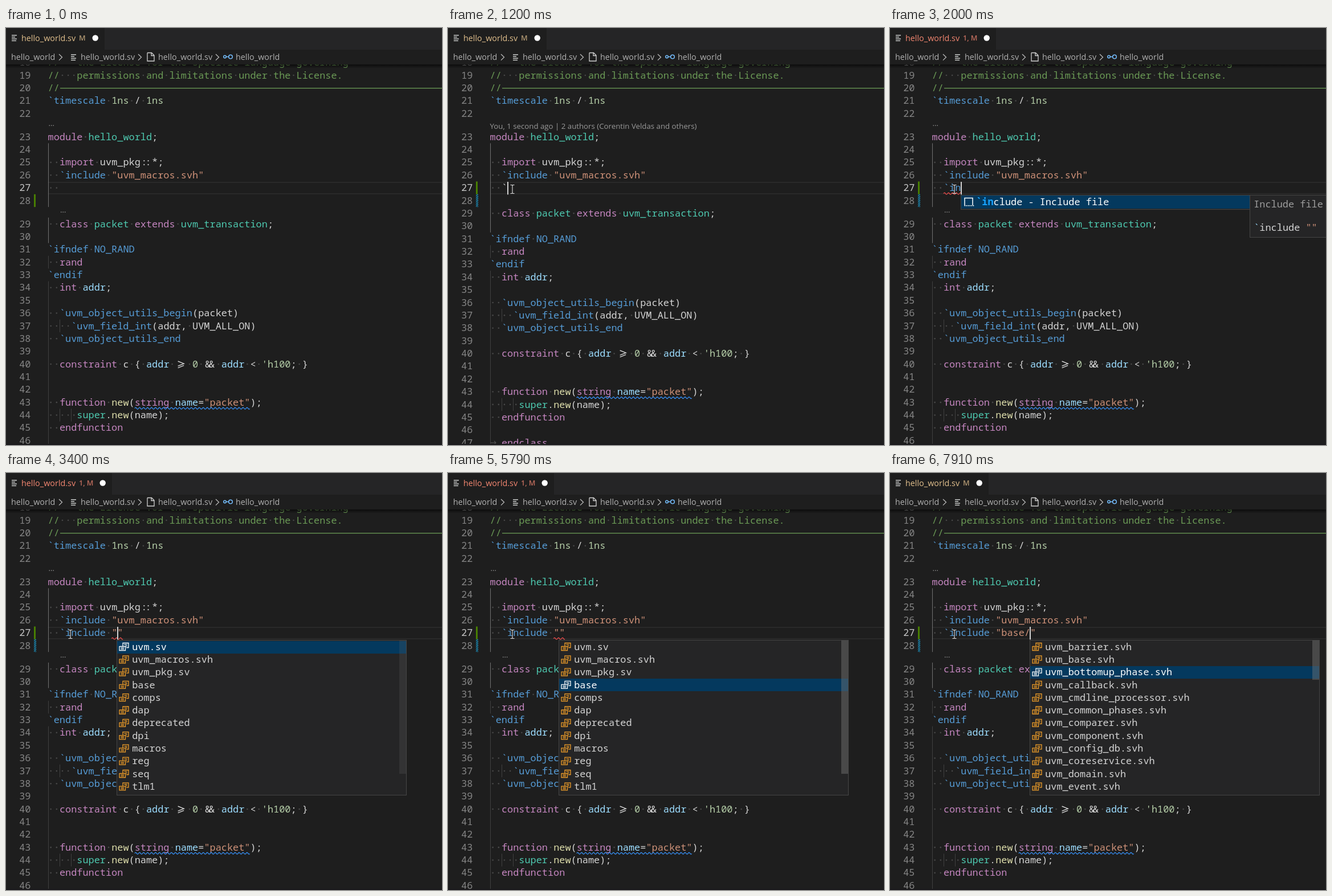
Animation of 765 by 732 pixels, one loop 8 s. Source, as an HTML page with a canvas:

```html
<!DOCTYPE html>
<html lang="en">
<head>
<meta charset="utf-8">
<title>Include path completion</title>
<style>
  html, body { margin: 0; width: 100%; height: 100%; overflow: hidden; background: #1e1e1e; }
  canvas { display: block; }
</style>
</head>
<body>
<canvas id="stage" width="765" height="732"></canvas>
<script>
const ctx = document.getElementById('stage').getContext('2d');
const W = 765, H = 732, LOOP = 8000;
const LEFT = 73.6, CHAR = 10.14, LINE = 22.37, LENS = 18.6;
const MONO = '16.9px "Noto Sans Mono", "DejaVu Sans Mono", monospace';
const CODE = '500 ' + MONO;
const UI = '14.35px "Open Sans", "Noto Sans", sans-serif';
const SMALL = '13.25px "Open Sans", "Noto Sans", sans-serif';
const BADGE = '600 12.6px "Open Sans", "Noto Sans", sans-serif';
const AUTHOR = 'Corentin Veldas';

// Code markup: "~" plus a colour key starts each run of text.
const COLORS = {
  w: '#d4d4d4', p: '#c586c0', t: '#4ec9b0', b: '#569cd6', s: '#ce9178',
  n: '#b5cea8', v: '#9cdcfe', f: '#dcdcaa', g: '#6a9955'
};
const ROWS = {
  18: '~g//   the License for the specific language governing',
  19: '~g//   permissions and limitations under the License.',
  20: '~g//',
  21: '~b`timescale ~n1ns ~w/ ~n1ns',
  23: '~pmodule ~thello_world~w;',
  25: '~p  import ~wuvm_pkg::*;',
  26: '~b  `include ~s"uvm_macros.svh"',
  29: '~p  class ~tpacket ~pextends ~tuvm_transaction~w;',
  31: '~b`ifndef NO_RAND',
  32: '~p  rand',
  33: '~b`endif',
  34: '~p  int ~vaddr~w;',
  36: '~b  `uvm_object_utils_begin~w(packet)',
  37: '~b    `uvm_field_int~w(addr, UVM_ALL_ON)',
  38: '~b  `uvm_object_utils_end',
  40: "~p  constraint ~wc { ~vaddr ~w>= ~n0 ~w&& ~vaddr ~w< ~n'h100~w; }",
  43: '~p  function ~fnew~w(~pstring ~vname~w=~s"packet"~w);',
  44: '~t     super~w.~fnew~w(name);',
  45: '~p  endfunction'
};
const FOLDERS = ['uvm.sv', 'uvm_macros.svh', 'uvm_pkg.sv', 'base', 'comps', 'dap',
  'deprecated', 'dpi', 'macros', 'reg', 'seq', 'tlm1'];
const FILES = ['barrier', 'base', 'bottomup_phase', 'callback', 'cmdline_processor',
  'common_phases', 'comparer', 'component', 'config_db', 'coreservice', 'domain',
  'event'].map(name => `uvm_${name}.svh`);

// Timelines: [start in ms, value]
const INPUT = [[0, '~w  '], [1200, '~w  `'], [1400, '~b  `i'], [1530, '~b  `in'],
  [2200, '~b  `include ~s""'], [5920, '~b  `include ~s"base"'], [6250, '~b  `include ~s"base/"']];
const CARET_COL = [[0, 2], [1200, 3], [1400, 4], [1530, 5], [2200, 12], [5920, 16], [6250, 17]];
const CARET_ON = [[0, 0], [600, 1], [1000, 0], [1200, 1], [2800, 0], [3330, 1], [3800, 0],
  [4320, 1], [4790, 0], [5260, 1], [5790, 0], [5920, 1], [6450, 0], [6910, 1], [7440, 0], [7910, 1]];
const POPUP = [[0, ''], [1600, 'snippet'], [2200, ''], [3330, 'folders'], [5920, ''], [6650, 'files']];
const SELECTED = [[0, 0], [4120, 1], [4660, 2], [5060, 3], [6650, 0], [7380, 1], [7510, 2]];
const THUMB = [[0, 0], [3400, 0.4], [3460, 1], [6650, 0.4], [6710, 1]];
const ERROR_SPAN = [[0, null], [1660, [2, 5]], [2600, [11, 13]], [5920, [11, 17]], [6450, null]];

function at(t, line) {
  let value = line[0][1];
  for (const [start, v] of line) if (t >= start) value = v;
  return value;
}

function rect(x, y, w, h, color) {
  ctx.fillStyle = color;
  ctx.fillRect(x, y, w, h);
}

function text(str, x, y, font, color) {
  ctx.font = font;
  ctx.fillStyle = color;
  ctx.fillText(str, x, y);
}

function path(color, width, ...lines) {
  ctx.strokeStyle = color;
  ctx.lineWidth = width;
  ctx.beginPath();
  for (const pts of lines)
    for (let i = 0; i < pts.length; i += 2)
      i ? ctx.lineTo(pts[i], pts[i + 1]) : ctx.moveTo(pts[i], pts[i + 1]);
  ctx.stroke();
}

function disc(x, y, r, color) {
  ctx.fillStyle = color;
  ctx.beginPath();
  ctx.arc(x, y, r, 0, 7);
  ctx.fill();
}

const colX = col => LEFT + col * CHAR;

function rowY(n, lens) {
  return 60.7 + (n - 18) * LINE + (n >= 23 ? LENS : 0) + (n >= 29 && lens ? LENS : 0);
}

// Text baselines sit on whole pixels so that the glyphs stay crisp.
const baseline = y => Math.round(y + 5.6);

function ligature(pair, x, y) {
  if (pair === '>=') {
    path(ctx.fillStyle, 1.4, [x + 5, y - 11, x + 15.5, y - 6.8, x + 5, y - 2.6],
      [x + 5, y + 0.6, x + 15.5, y - 3.6]);
    return;
  }
  const shift = 1.5;
  ctx.fillText(pair[0], x + shift, y);
  ctx.fillText(pair[1], x + CHAR - shift, y);
}

function codeLine(markup, y) {
  let col = 0;
  for (const [, key, run] of markup.matchAll(/~(.)([^~]*)/g))
    for (const part of run.split(/(::|&&|>=|\s+)/)) {
      const x = colX(col);
      ctx.font = CODE;
      ctx.fillStyle = COLORS[key];
      if (/^(::|&&|>=)$/.test(part)) ligature(part, x, baseline(y));
      else if (part.trim()) ctx.fillText(part, x, baseline(y));
      else for (let i = 0; i < part.length; i++) disc(x + (i + 0.5) * CHAR, y, 1.3, '#484848');
      col += part.length;
    }
}

function squiggle(x1, x2, y, color) {
  const pts = [];
  for (let x = x1; x <= x2; x++) pts.push(x, y - 1.5 * Math.sin((x - x1) * 0.9));
  path(color, 1.2, pts);
}

function listIcon(x, y, color = '#c8cac9') {
  [9, 6, 9, 8].forEach((w, i) => rect(x, y - 5 + i * 3.2, w, 1.5, color));
}

function header(failed) {
  rect(0, 0, W, 64, '#1e1e1e');
  const tab = failed ? 186 : 173, color = failed ? '#f48771' : '#e2c08d';
  rect(tab, 0, W - tab, 38, '#252526');
  listIcon(10, 17);
  text('hello_world.sv', 27, 23, UI, color);
  ctx.globalAlpha = 0.75;
  text(failed ? '1, M' : 'M', 128, 22, BADGE, color);
  ctx.globalAlpha = 1;
  disc(tab - 16.3, 17.5, 5.2, '#ffffff');

  const gray = '#b0b0b0';
  [['hello_world', 9], ['hello_world.sv', 131], ['hello_world.sv', 267], ['hello_world', 403]]
    .forEach(([name, x]) => text(name, x, 56, UI, gray));
  for (const x of [93, 232, 368]) path('#b8b8b8', 1.3, [x, 46, x + 5.5, 51.3, x, 56.6]);
  listIcon(114, 51);
  path('#d0d0d0', 1.3, [248, 43.5, 255.5, 43.5, 260, 48, 260, 58, 248, 58, 248, 43.5],
    [255, 43.5, 255, 48.5, 260, 48.5]);
  ctx.strokeStyle = '#75beff';
  ctx.lineWidth = 1.5;
  for (const [x, r] of [[384, 2.2], [394, 3.3]]) {
    ctx.beginPath();
    ctx.arc(x, 50.5, r, 0, 7);
    ctx.stroke();
  }
  path('#75beff', 1.5, [386, 50.5, 391, 50.5]);

  const shade = ctx.createLinearGradient(0, 64, 0, 71);
  shade.addColorStop(0, 'rgba(0,0,0,0.6)');
  shade.addColorStop(1, 'rgba(0,0,0,0)');
  rect(0, 64, W, 7, shade);
}

function lensLine(str, x, y) {
  text(str, str === '…' ? x + 1 : x, Math.round(y - (str === '…' ? 19.5 : 14.2)), SMALL, '#999999');
}

function gutter(t, y) {
  const y27 = y(27) - LINE / 2, y28 = y(28) - LINE / 2;
  if (t < 1200) return rect(49, y28, 3, LINE, '#487e02');
  rect(49, y27, 3, LINE, '#487e02');
  ctx.save();
  ctx.beginPath();
  ctx.rect(49, y28, 4, LINE);
  ctx.clip();
  for (let s = y28; s < y28 + 28; s += 3.6) path('#1b81a8', 1.6, [48, s + 1, 54, s - 5]);
  ctx.restore();
}

function guides(y) {
  const bar = (col, from, to, color) =>
    rect(Math.round(colX(col)), y(from) - LINE / 2, 1, y(to) - y(from) + LINE, color);
  bar(0, 24, 28, '#707070');
  bar(0, 29, 30, '#707070');
  bar(0, 32, 32, '#404040');
  bar(0, 34, 47, '#404040');
  bar(2, 37, 37, '#404040');
  bar(2, 44, 44, '#404040');
  bar(4, 44, 44, '#404040');
}

function editor(t) {
  const lens = t < 1200 || t >= 2000;
  const y = n => rowY(n, lens);
  rect(LEFT, 270, W, 2, '#292929');
  rect(LEFT, 290, W, 2, '#292929');
  guides(y);

  ctx.textAlign = 'right';
  for (let n = 18; n <= 47; n++)
    text(n, 43.5, baseline(y(n)), MONO, n === 27 ? '#c6c6c6' : '#858585');
  ctx.textAlign = 'left';
  gutter(t, y);

  for (const n in ROWS) codeLine(ROWS[n], y(+n));
  rect(95, Math.round(y(20) - 0.7), W, 1.3, '#6a9955');
  path('#505050', 1.2, [75, y(47), 84, y(47)], [81, y(47) - 3, 84, y(47), 81, y(47) + 3]);
  text('endclass', colX(2), baseline(y(47)), CODE, COLORS.p);
  codeLine(at(t, INPUT), y(27));

  squiggle(colX(15), colX(35), y(43) + 10.5, '#3794ff');
  const error = at(t, ERROR_SPAN);
  if (error) squiggle(colX(error[0]), colX(error[1]), y(27) + 10, '#f14c4c');

  lensLine(t >= 670 && t < 1330 ? `You, 1 second ago | 2 authors (${AUTHOR} and others)` : '…', LEFT, y(23));
  if (lens) lensLine(t >= 740 && t < 1200 ? `${AUTHOR}, 3 months ago | 1 author (${AUTHOR})` : '…', colX(2), y(29));

  if (at(t, CARET_ON)) rect(Math.floor(colX(at(t, CARET_COL))), 270, 2, 22.4, '#d0d0d0');
}

function panel(x, y, w, h) {
  rect(x, y, w, h, '#252526');
  ctx.strokeStyle = '#454545';
  ctx.lineWidth = 1;
  ctx.strokeRect(x + 0.5, y + 0.5, w - 1, h - 1);
}

function itemIcon(x, y, color) {
  path(color, 1.3,
    [x + 6, y - 1, x + 6, y - 6.5, x + 16, y - 6.5, x + 16, y + 1.5, x + 12, y + 1.5],
    [x, y - 0.5, x + 10.5, y - 0.5, x + 10.5, y + 6.5, x, y + 6.5, x, y - 1.1],
    [x + 8.5, y - 3.8, x + 13.5, y - 3.8], [x + 10.5, y - 1.4, x + 13.5, y - 1.4],
    [x + 2.5, y + 1.9, x + 8, y + 1.9], [x + 2.5, y + 4.2, x + 8, y + 4.2]);
}

function list(items, x, thumbH, t) {
  const selected = at(t, SELECTED);
  panel(x, 293, 509, 273);
  items.forEach((name, i) => {
    const y = 305 + i * 22.3, on = i === selected;
    if (on) rect(x + 1, Math.round(y - 10.5), 507, 22, '#04395e');
    itemIcon(x + 5, y, on ? '#ffffff' : '#ee9d28');
    text(name, x + 27.2, baseline(y), CODE, on ? '#ffffff' : '#d4d4d4');
  });
  rect(x + 496, 294, 12, thumbH, `rgba(121,121,121,${0.42 * at(t, THUMB)})`);
}

function snippet(t) {
  panel(124, 293, 508, 26);
  rect(125, 294, 506, 23, '#04395e');
  path('#ffffff', 1.5, [131, 311, 131, 298.5, 145, 298.5, 145, 311]);
  for (let x = 130.5; x < 146; x += 3) rect(x, 311, 1.7, 1.7, '#ffffff');
  text('`in', 151.2, 311, 'bold ' + MONO, '#18a3ff');
  text('clude - Include file', 151.2 + 3 * CHAR, 311, CODE, '#ffffff');
  if (t < 1800) return;
  panel(631, 293, 150, 75);
  text('Include file', 638.2, 315, CODE, '#9d9d9d');
  text('`', 638.2, 356, CODE, COLORS.v);
  text('include', 638.2 + CHAR, 356, CODE, COLORS.w);
  text('""', 638.2 + 9 * CHAR, 356, CODE, COLORS.s);
}

function pointer(t) {
  if (t < 70) return;
  const u = Math.min(5, Math.floor((t - 70) / 66)) / 5;
  const rest = (1 - u) ** 2;
  const x = 113 + 647 * rest, y = 283 + 372 * rest;
  path('#e0e0e0', 1.1, [x - 3.5, y - 7.5, x - 1, y - 7.5, x, y - 6.5, x + 1, y - 7.5, x + 3.5, y - 7.5],
    [x, y - 6.5, x, y + 6.5],
    [x - 3.5, y + 7.5, x - 1, y + 7.5, x, y + 6.5, x + 1, y + 7.5, x + 3.5, y + 7.5]);
}

function draw(t) {
  rect(0, 0, W, H, '#1e1e1e');
  editor(t);
  header(t >= 1660 && t < 6320);
  rect(0, 730, W, 2, '#19181b');
  const popup = at(t, POPUP);
  if (popup === 'snippet') snippet(t);
  if (popup === 'folders') list(FOLDERS, 194, 234, t);
  if (popup === 'files') list(FILES, 245, 69, t);
  pointer(t);
}

const begin = performance.now();
function tick() {
  draw((performance.now() - begin) % LOOP);
  requestAnimationFrame(tick);
}
tick();
</script>
</body>
</html>
```
